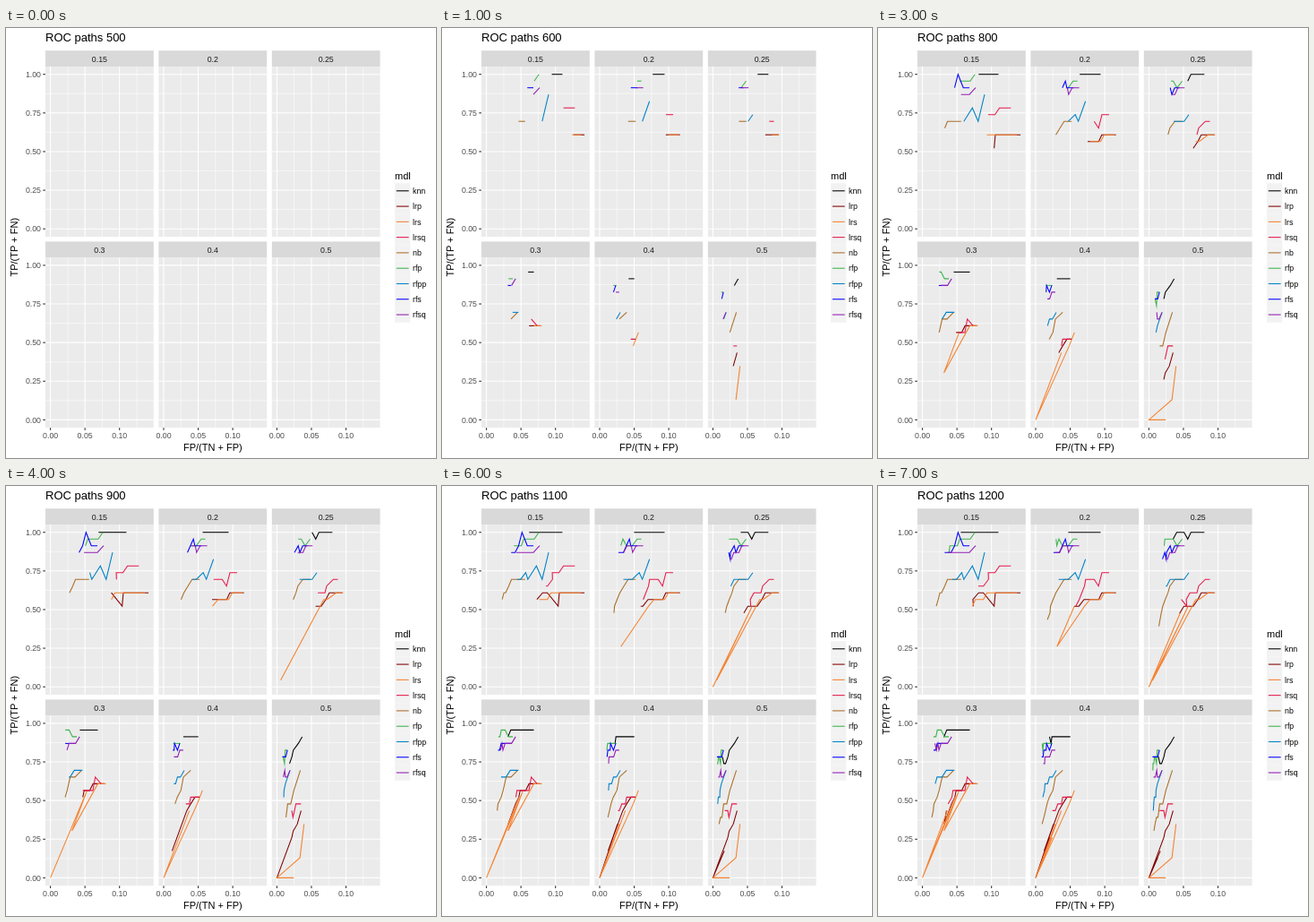
An HTML page with a canvas that plays this animation: 480x480 px, repeating every 8 s.

```html
<!DOCTYPE html>
<html>
<head>
<meta charset="utf-8">
<style>
html, body { margin: 0; width: 100%; height: 100%; overflow: hidden; background: #fff; }
canvas { display: block; }
</style>
</head>
<body>
<canvas id="stage" width="480" height="480"></canvas>
<script>
const ctx = document.getElementById('stage').getContext('2d');
const STEPS = 8, POSITIVES = 23, WIDTH = 120.8, HEIGHT = 190;
const clamp = v => Math.max(0, Math.min(1, v));
const noise = seed => {
  const v = Math.sin(seed * 12.9898) * 43758.5453;
  return 2 * (v - Math.floor(v)) - 1;
};

// fp: first false positive rate, fade: its decay towards high thresholds,
// keep: share of it left after the last step, wobble: jitter of the hits.
// hits(u, s, k): true positives for threshold u and progress s, both 0 to 1, at step k.
// onset: how late the model starts to collapse to zero on every second step.
const models = [
  { name: 'knn', color: '#000000', fp: 0.110, fade: 1.1, keep: 0.5, wobble: 0.45,
    hits: (u, s) => 23 - 1.6 * clamp(4 * u - 1.1 + 0.5 * s) - 4 * u ** 6 * clamp(2 * s) },
  { name: 'lrp', color: '#800000', fp: 0.142, fade: 1.4, keep: 0.5, wobble: 0.9, onset: 3.7,
    hits: (u, s) => 14 - 4.5 * u ** 3 - (1.5 + 5.5 * u) * s },
  { name: 'lrs', color: '#f58231', fp: 0.137, fade: 1.25, keep: 0.53, wobble: 0.7, onset: 0.8,
    hits: (u, s) => 14.3 - 6 * u ** 5 - (1.5 + 6 * u + 34 * u ** 8) * s },
  { name: 'lrsq', color: '#e6194b', fp: 0.128, fade: 1.3, keep: 0.6, wobble: 0.9,
    hits: (u, s) => 18.3 - 7.5 * clamp(1.2 * u) - (4.5 - 3.5 * u) * s },
  { name: 'nb', color: '#aa6e28', fp: 0.056, fade: 0.5, keep: 0.36, wobble: 0.3,
    hits: (u, s) => 16 - (4 + 5 * Math.sqrt(u)) * s ** (1.6 - u) },
  { name: 'rfp', color: '#3cb44b', fp: 0.076, fade: 1.6, keep: 0.5, wobble: 0.8,
    hits: (u, s) => 23 - 4 * u - 2.5 * (1 - 2 * u) ** 2 * Math.sqrt(s) },
  { name: 'rfpp', color: '#0082c8', fp: 0.090, fade: 1.55, keep: 0.48, wobble: 0.4,
    hits: (u, s, k) => 16 - 6 * u ** 1.5 * s
      + 4 * clamp(1 - 2.3 * u) * Math.cos(Math.PI * k / 2) ** 2 * Math.exp(-0.35 * k) },
  { name: 'rfs', color: '#0000ff', fp: 0.068, fade: 1.5, keep: 0.5, wobble: 0.7,
    hits: (u, s, k) => 21.2 - 2.2 * u - 1.2 * s
      + 2 * (1 - u) ** 9 * Math.sin(Math.PI * clamp(k / 4)) ** 4 },
  { name: 'rfsq', color: '#911eb4', fp: 0.077, fade: 1.4, keep: 0.5, wobble: 0.6,
    hits: (u, s) => 21.2 - 5 * u ** 2.5 - 1.4 * Math.sqrt(s) }
];

function rates(model, m, threshold, k) {
  const u = (threshold - 0.15) / 0.35, s = k / (STEPS - 1);
  const seed = 1000 * threshold + 17 * m + k;
  const collapse = model.onset && k % 2 === 0 ? clamp(1.5 * u * k - model.onset) : 0;
  const fp = model.fp * Math.exp(-model.fade * u) * model.keep ** (s ** 0.8 * (1 + u / 2));
  const jitter = k ? 1 + 0.06 * noise(seed + 0.5) : 1;
  const hits = model.hits(u, s, k) + (k ? model.wobble * noise(seed) : 0);
  return {
    fp: fp * jitter * (1 - collapse),
    tp: clamp(Math.round(hits * (1 - collapse)) / POSITIVES)
  };
}

const panels = [0.15, 0.2, 0.25, 0.3, 0.4, 0.5].map((threshold, i) => ({
  threshold,
  left: 44 + 126.4 * (i % 3),
  top: i < 3 ? 43 : 256.2,
  paths: models.map((model, m) =>
    Array.from({ length: STEPS }, (_, k) => rates(model, m, threshold, k)))
}));

const xPos = (p, v) => p.left + 5.6 + 771 * v;
const yPos = (p, v) => p.top + 181.2 - 172.5 * v;

function rect(x, y, w, h, color) {
  ctx.fillStyle = color;
  ctx.fillRect(x, y, w, h);
}

function line(points, color, width = 1.07) {
  ctx.strokeStyle = color;
  ctx.lineWidth = width;
  ctx.beginPath();
  for (const [x, y] of points) ctx.lineTo(x, y);
  ctx.stroke();
}

function text(s, x, y, size = 8.8, color = '#000', align = 'left') {
  ctx.font = size + 'px "Liberation Sans", Arial, sans-serif';
  ctx.fillStyle = color;
  ctx.textAlign = align;
  ctx.fillText(s, x, y);
}

function drawGrid(p) {
  const row = (v, width) => line([[p.left, yPos(p, v)], [p.left + WIDTH, yPos(p, v)]], '#fff', width);
  const column = (v, width) => line([[xPos(p, v), p.top], [xPos(p, v), p.top + HEIGHT]], '#fff', width);
  const weight = i => i % 2 ? 0.53 : 1.07;
  for (let i = 0; i <= 8; i++) row(i / 8, weight(i));
  for (let i = 0; i <= 5; i++) column(i * 0.025, weight(i));
}

function drawPanel(p, i, step) {
  rect(p.left, p.top - 17.8, WIDTH, 17.8, '#d9d9d9');
  text(p.threshold, p.left + WIDTH / 2, p.top - 5, 8.8, '#1a1a1a', 'center');
  rect(p.left, p.top, WIDTH, HEIGHT, '#ebebeb');
  drawGrid(p);
  p.paths.forEach((path, m) => {
    const points = path.slice(0, step + 1).map(({ fp, tp }) => [xPos(p, fp), yPos(p, tp)]);
    line(points, models[m].color);
  });
  if (i % 3 === 0) {
    for (let v = 0; v <= 1; v += 0.25) {
      const y = yPos(p, v);
      line([[p.left - 2.75, y], [p.left, y]], '#333');
      text(v.toFixed(2), p.left - 5, y + 3.2, 8.8, '#4d4d4d', 'right');
    }
  }
  if (i > 2) {
    for (const v of [0, 0.05, 0.1]) {
      const x = xPos(p, v), bottom = p.top + HEIGHT;
      line([[x, bottom], [x, bottom + 2.75]], '#333');
      text(v.toFixed(2), x, bottom + 11.5, 8.8, '#4d4d4d', 'center');
    }
  }
}

function drawLegend() {
  text('mdl', 434, 169, 11);
  models.forEach(({ name, color }, i) => {
    const y = 181.8 + 17.28 * i;
    rect(434, y - 8.64, 17.28, 17.28, '#f2f2f2');
    line([[435.8, y], [449.6, y]], color);
    text(name, 454, y + 3.2);
  });
}

function draw(step) {
  rect(0, 0, 480, 480, '#fff');
  text('ROC paths ' + (500 + 100 * step), 44, 15, 13);
  panels.forEach((p, i) => drawPanel(p, i, step));
  text('FP/(TN + FP)', 230.8, 472, 11, '#000', 'center');
  ctx.save();
  ctx.translate(13, 244.7);
  ctx.rotate(-Math.PI / 2);
  text('TP/(TP + FN)', 0, 0, 11, '#000', 'center');
  ctx.restore();
  drawLegend();
}

function tick() {
  draw(Math.floor(performance.now() / 1000) % STEPS);
  requestAnimationFrame(tick);
}
tick();
</script>
</body>
</html>
```
